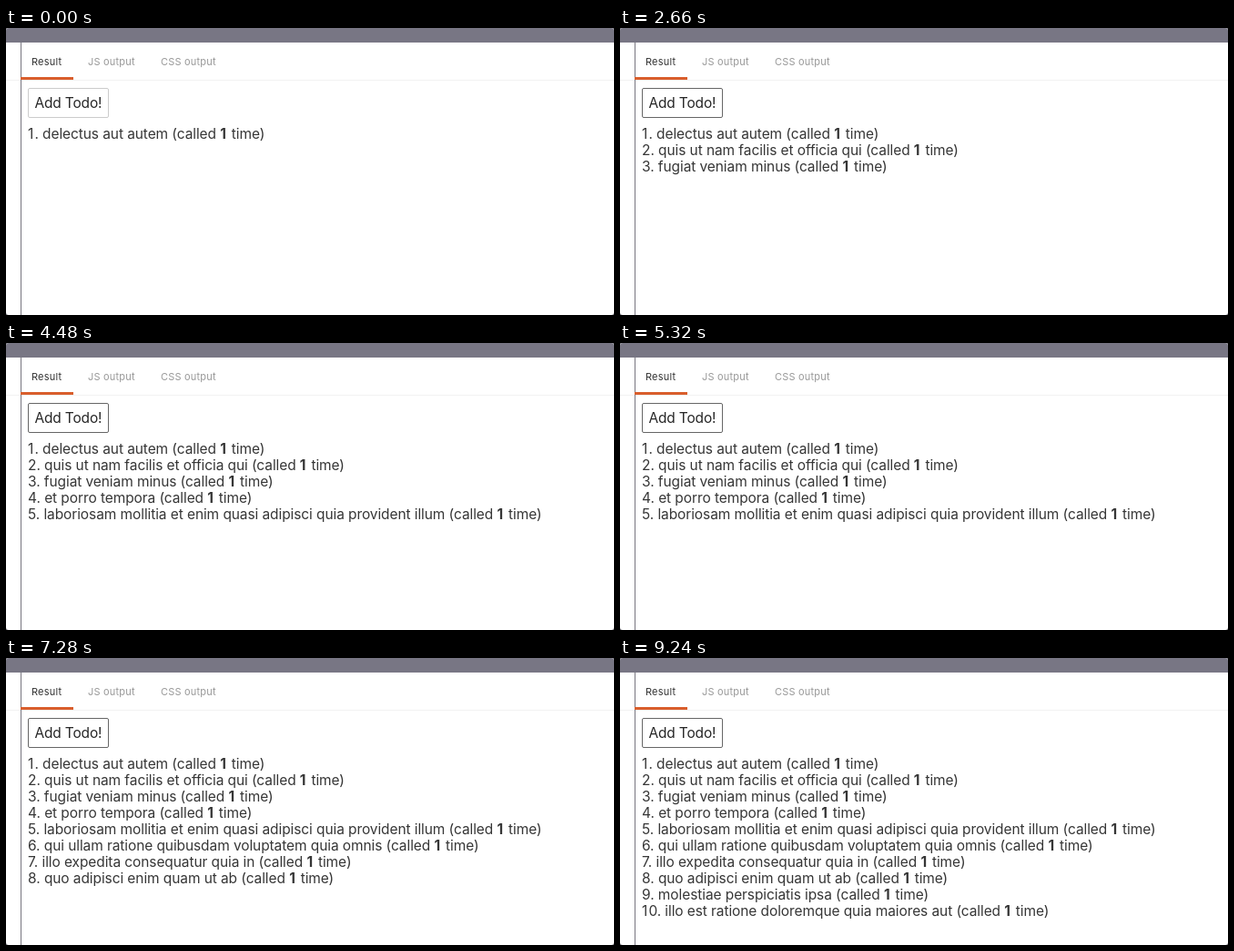
Write an HTML page that moves like this. It is 668x316 px and loops after 9310 ms.

```html
<!DOCTYPE html>
<html lang="en">
<head>
<meta charset="utf-8">
<title>Todo list</title>
<style>
  html, body { margin: 0; width: 100%; height: 100%; overflow: hidden; background: #fff; }
  svg { display: block; width: 668px; height: 316px; }
  text { font: 15.5px Inter, "Noto Sans", sans-serif; letter-spacing: -.09px; fill: #363636; white-space: pre; }
  .tab { font-size: 11px; letter-spacing: .2px; fill: #999; }
  .tab.on { fill: #333; }
  .label { fill: #262626; letter-spacing: -.16px; }
  .one { letter-spacing: 1px; }
  .count { font-weight: 700; letter-spacing: 1.6px; }
</style>
</head>
<body>
<svg viewBox="0 0 668 316">
  <rect width="668" height="316" fill="#66656d"/>
  <rect width="668" height="316" rx="3" fill="#fff"/>
  <path d="M0 16V3a3 3 0 0 1 3-3H665a3 3 0 0 1 3 3V16Z" fill="#787684"/>
  <rect y="57" width="668" height="1" fill="#f2f2f2"/>
  <rect x="16" y="16" width="1" height="300" fill="#77757f"/>
  <rect x="16" y="54" width="58" height="3" fill="#d95e2c"/>
  <text class="tab on" x="28" y="41">Result</text>
  <text class="tab" x="90" y="41">JS output</text>
  <text class="tab" x="170" y="41">CSS output</text>
  <rect id="button" x="24.5" y="66.5" width="88" height="32" rx="1.5"/>
  <text class="label" x="68.4" y="88" text-anchor="middle">Add Todo!</text>
  <g id="list"></g>
</svg>
<script>
const LOOP = 9310;
const PRESS_TIME = 70;
const presses = [1400, 5250, 8750];
const todos = [
  [0, 'delectus aut autem'],
  [1610, 'quis ut nam facilis et officia qui'],
  [2660, 'fugiat veniam minus'],
  [3640, 'et porro tempora'],
  [4480, 'laboriosam mollitia et enim quasi adipisci quia provident illum'],
  [5460, 'qui ullam ratione quibusdam voluptatem quia omnis'],
  [6370, 'illo expedita consequatur quia in'],
  [7210, 'quo adipisci enim quam ut ab'],
  [8120, 'molestiae perspiciatis ipsa'],
  [8890, 'illo est ratione doloremque quia maiores aut']
];

const button = document.getElementById('button');
const list = document.getElementById('list');

const span = (name, text) => `<tspan class="${name}">${text}</tspan>`;
// Inter's 1 is narrow, so it gets a little more room.
const number = n => String(n).replace('1', span('one', 1));

list.innerHTML = todos.map(([, title], i) =>
  `<text x="24.1" y="${122 + 18 * i}">${number(i + 1)}. ${title} (called ${span('count', 1)} time)</text>`
).join('');
const rows = [...list.children];

function draw(t) {
  const pressed = presses.some(p => t >= p && t < p + PRESS_TIME);
  const focused = t >= presses[0];
  button.setAttribute('fill', pressed ? '#e3e3e3' : '#fff');
  button.setAttribute('stroke', focused ? '#666' : '#ccc');
  rows.forEach((row, i) => {
    row.setAttribute('visibility', t >= todos[i][0] ? 'visible' : 'hidden');
  });
}

const start = performance.now();
function tick() {
  draw((performance.now() - start) % LOOP);
  requestAnimationFrame(tick);
}
tick();
</script>
</body>
</html>
```
